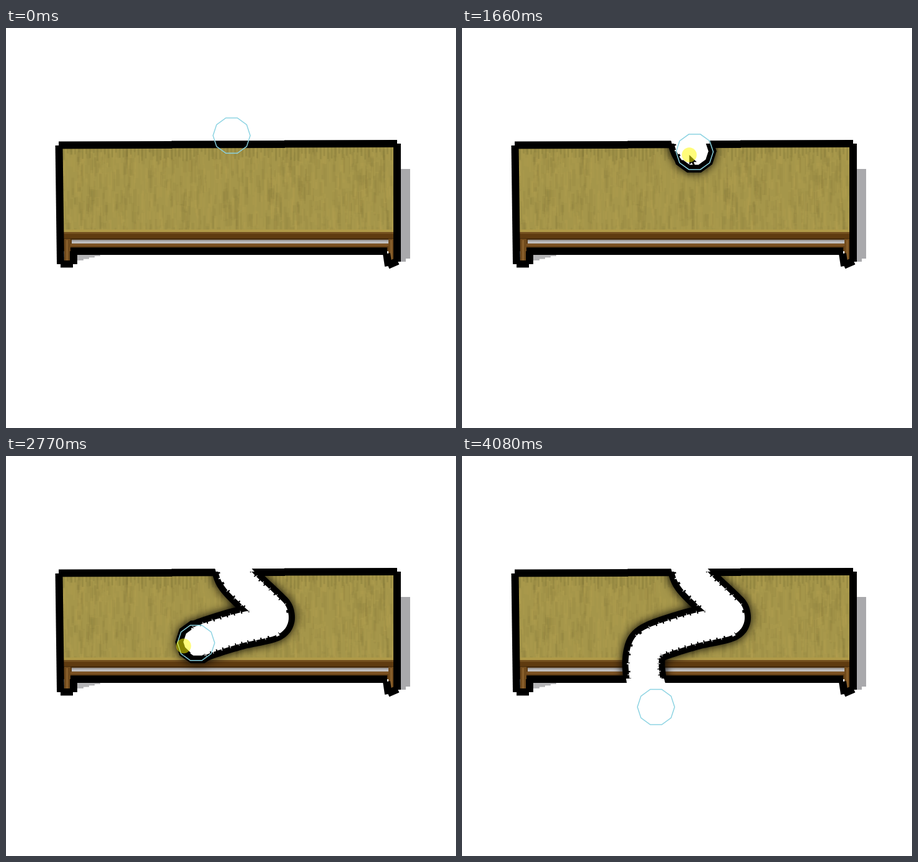
An HTML page with a canvas that plays this animation: 726x647 px, repeating every 4720 ms.

```html
<!DOCTYPE html>
<html lang="en">
<head>
<meta charset="utf-8">
<title>Table cut</title>
<style>
html, body { margin: 0; width: 726px; height: 647px; overflow: hidden; background: #fff; }
canvas { display: block; }
</style>
</head>
<body>
<canvas id="stage" width="726" height="647"></canvas>
<script>
const W = 726, H = 647, LOOP = 4720, FRAME = 46;
const PRESS = 1280, RELEASE = 3560;

// Movement comes in bursts with rests between them
const BURSTS = [[40, 540], [610, 740], [PRESS, 1760], [1810, 2310], [2380, 2870], [2920, 3330], [3710, 4080]];

// Route of the round brush: time, x, y
const ROUTE = [
  [PRESS, 364, 174], [1660, 375, 200], [2080, 424, 248], [2200, 431, 257],
  [2320, 427, 267], [2600, 368, 281], [2770, 309, 301], [2920, 295, 318],
  [3150, 295, 360], [3200, 305, 394], [3330, 313, 406]
];

const stage = document.getElementById('stage').getContext('2d');

function layer() {
  const c = document.createElement('canvas');
  c.width = W;
  c.height = H;
  return c.getContext('2d');
}

function seeded(seed) {
  return () => (seed = seed * 16807 % 2147483647) / 2147483647;
}

const mix = (a, b, p) => a + (b - a) * p;
const clamp = p => Math.min(1, Math.max(0, p));

function snap(t) {
  let held = 0;
  for (const [start, end] of BURSTS) {
    if (t < start) return held;
    if (t < end) {
      const gap = (end - start) / Math.round((end - start) / FRAME);
      return start + Math.floor((t - start) / gap + 0.25) * gap;
    }
    held = end;
  }
  return held;
}

// Smooth curve through the route's points
function brushAt(t) {
  const last = ROUTE.length - 1;
  if (t <= ROUTE[0][0]) return ROUTE[0].slice(1);
  if (t >= ROUTE[last][0]) return ROUTE[last].slice(1);
  const i = ROUTE.findIndex(k => k[0] > t) - 1;
  const a = ROUTE[i], b = ROUTE[i + 1];
  const before = ROUTE[Math.max(0, i - 1)], after = ROUTE[Math.min(last, i + 2)];
  const span = b[0] - a[0], s = (t - a[0]) / span;
  return [1, 2].map(d => {
    const m0 = (b[d] - before[d]) / (b[0] - before[0]) * span;
    const m1 = (after[d] - a[d]) / (after[0] - a[0]) * span;
    return (2 * s ** 3 - 3 * s * s + 1) * a[d] + (s ** 3 - 2 * s * s + s) * m0 +
      (3 * s * s - 2 * s ** 3) * b[d] + (s ** 3 - s * s) * m1;
  });
}

// The pointer sweeps in, leads the brush by about one frame, then leaves
function pointerAt(t) {
  if (t < 610) {
    const p = clamp((t - 40) / 500), s = p * (2 - p);
    const bend = (a, b, c) => mix(mix(a, b, s), mix(b, c, s), s);
    return [bend(638, 297, 337), bend(632, 180, 177)];
  }
  if (t < PRESS) {
    const p = clamp((t - 610) / 130);
    return [mix(337, 351, p), mix(177, 162, p)];
  }
  if (t < 3710) {
    const [x, y] = brushAt(t + 50);
    return [x - 13, y];
  }
  const p = clamp((t - 3690) / 390) ** 1.6;
  return [mix(300, 690, p), mix(406, 665, p)];
}

function rect(g, color, x0, y0, x1, y1) {
  g.fillStyle = color;
  g.fillRect(x0, y0, x1 - x0, y1 - y0);
}

function trace(g, points) {
  g.beginPath();
  points.forEach(([x, y]) => g.lineTo(x, y));
}

function polygon(g, color, points) {
  trace(g, points);
  g.fillStyle = color;
  g.fill();
}

function bar(g, x0, y0, x1, y1) {
  trace(g, [[x0, y0], [x1, y1]]);
  g.strokeStyle = '#000';
  g.lineWidth = 12;
  g.stroke();
}

function drawCloth(g) {
  const rnd = seeded(4211);
  g.save();
  g.beginPath();
  g.rect(90, 192, 537, 136);
  g.clip();
  rect(g, '#a5964a', 90, 192, 627, 328);
  for (let i = 0; i < 1100; i++) {
    const x = 88 + rnd() * 538, y = 180 + rnd() * 145;
    g.fillStyle = rnd() < 0.5 ? 'rgba(132,121,55,.16)' : 'rgba(178,162,82,.2)';
    g.fillRect(x, y, 2 + rnd() * 4, 10 + rnd() * 28);
  }
  for (let x = 92; x < 626; x += 6) {
    rect(g, 'rgba(118,108,48,.25)', x, 192, x + 3, 200 + rnd() * 16);
  }
  g.restore();
}

function drawRails(g) {
  rect(g, '#5f3d15', 93, 340, 626, 361);
  rect(g, '#b09a48', 93, 326, 626, 330);
  rect(g, '#74501f', 93, 330, 626, 333);
  rect(g, '#5f3b10', 93, 333, 626, 340);
  rect(g, '#462b0b', 93, 340, 626, 342.5);
  const gap = g.createLinearGradient(0, 342, 0, 349);
  gap.addColorStop(0, '#8c8a8a');
  gap.addColorStop(1, '#dcdcde');
  rect(g, gap, 106, 342.5, 619, 348.5);
  rect(g, '#7b5122', 104, 349, 619, 353);
  for (const x of [94, 617]) {
    rect(g, '#704a1c', x, 341, x + 10, 377);
    rect(g, '#895f2b', x + 3, 343, x + 6, 376);
  }
}

function drawTable() {
  const g = layer();
  drawCloth(g);
  drawRails(g);
  bar(g, 85, 189.5, 268, 189);
  bar(g, 267, 188.5, 450, 188);
  bar(g, 449, 187.5, 631, 187);
  bar(g, 85.5, 190, 88, 382);
  bar(g, 631, 187, 631, 378);
  bar(g, 104, 361, 615, 361);
  rect(g, '#000', 103, 361, 115, 382);
  rect(g, '#000', 83, 376, 114, 382);
  rect(g, '#000', 88, 381, 108, 387.5);
  bar(g, 614, 365, 617, 385);
  bar(g, 616, 384, 632, 377);
  return g.canvas;
}

function drawShadow(g) {
  rect(g, '#a9a9ac', 630, 228, 652, 373);
  rect(g, '#a9a9ac', 630, 372, 645, 378);
  for (let i = 0; i < 4; i++) rect(g, '#b5b5b7', 110, 364, 152 - i * 9, 369 + i * 2.3);
}

function decagon([x, y], r) {
  return Array.from({ length: 10 }, (_, i) => {
    const a = i * Math.PI / 5;
    return [x + r * Math.cos(a), y + r * Math.sin(a)];
  });
}

function sweep(g, path, half) {
  g.strokeStyle = '#000';
  g.lineWidth = half * 2;
  g.lineJoin = 'round';
  trace(g, path);
  g.stroke();
  for (const end of [path[0], path[path.length - 1]]) {
    polygon(g, '#000', decagon(end, half / Math.cos(Math.PI / 10)));
  }
}

function dashes(g, path, half, pattern) {
  g.setLineDash(pattern);
  g.lineWidth = half * 2;
  trace(g, path);
  g.stroke();
  g.setLineDash([]);
}

function clippedSweep(g, path, half, y, height) {
  g.save();
  g.beginPath();
  g.rect(0, y, W, height);
  g.clip();
  sweep(g, path, half);
  g.restore();
}

const table = drawTable();
const work = layer();
const band = layer();

function cutTable(t) {
  const head = Math.max(PRESS, t - 12);
  const path = [];
  for (let u = PRESS; u < head; u += 15) path.push(brushAt(u));
  path.push(brushAt(head));

  band.clearRect(0, 0, W, H);
  sweep(band, path, 34.5);

  work.globalCompositeOperation = 'source-atop';
  work.shadowColor = '#000';
  work.shadowBlur = 15;
  work.drawImage(band.canvas, 0, 0);
  work.shadowColor = 'transparent';

  // Clear the middle, leaving ragged edges
  work.globalCompositeOperation = 'destination-out';
  sweep(work, path, 22);
  dashes(work, path, 24.5, [9, 2]);
  dashes(work, path, 27, [1, 14]);
  clippedSweep(work, path, 28, 0, 187);
  clippedSweep(work, path, 30, 360, 60);
  work.globalCompositeOperation = 'source-over';
}

function drawPointer([x, y], pressed) {
  const shape = [[0, 0], [0, 16], [4, 12.5], [7, 19], [9.5, 17.5], [7, 11.5], [12, 11.5]];
  polygon(stage, '#000', shape.map(([dx, dy]) => [x + dx, y + dy]));
  if (!pressed) return;
  stage.beginPath();
  stage.arc(x, y, 12, 0, Math.PI * 2);
  stage.fillStyle = 'rgba(255,250,0,.52)';
  stage.fill();
}

function render(time) {
  const t = snap(time);
  work.clearRect(0, 0, W, H);
  work.drawImage(table, 0, 0);
  if (time >= PRESS) cutTable(t);

  rect(stage, '#fff', 0, 0, W, H);
  drawShadow(stage);
  stage.drawImage(work.canvas, 0, 0);

  trace(stage, decagon(brushAt(t), 30));
  stage.closePath();
  stage.strokeStyle = '#8bd3e2';
  stage.lineWidth = 1.5;
  stage.stroke();

  const visible = time >= BURSTS[0][0] && time < 4080;
  if (visible) drawPointer(pointerAt(t), time >= PRESS && time < RELEASE);
}

const began = performance.now();
function tick() {
  render((performance.now() - began) % LOOP);
  requestAnimationFrame(tick);
}
tick();
</script>
</body>
</html>
```
